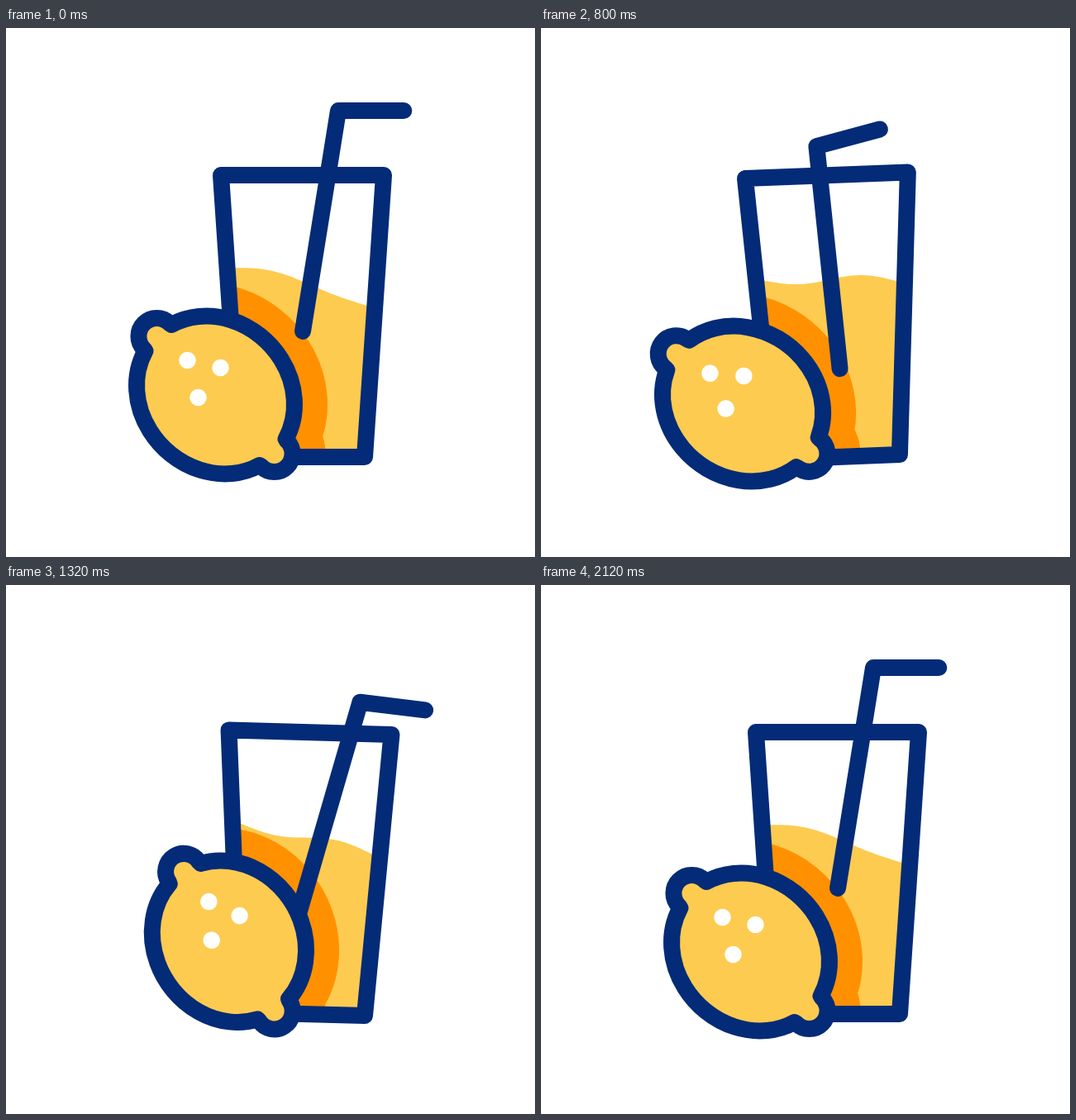
An HTML page with a canvas that plays this animation: 640x640 px, repeating every 2200 ms.

```html
<!DOCTYPE html>
<html lang="en">
<head>
<meta charset="utf-8">
<title>Lemonade</title>
<style>
html, body { margin: 0; width: 100%; height: 100%; overflow: hidden; background: #fff; }
canvas { display: block; width: 100vw; height: 100vh; }
</style>
</head>
<body>
<canvas width="640" height="640"></canvas>
<script>
const ctx = document.querySelector('canvas').getContext('2d');
const NAVY = '#042b77', YELLOW = '#fdcb50', ORANGE = '#ff9100';
const LOOP = 2200, STEP = 40, REST = 2120;
const PI = Math.PI, rad = d => d * PI / 180;

// Swing through [time, value] turning points, easing in and out of each
function swing(t, ...keys) {
  const i = keys.findIndex(k => t < k[0]);
  if (i === 0) return keys[0][1];
  if (i < 0) return keys[keys.length - 1][1];
  const [t0, a] = keys[i - 1], [t1, b] = keys[i];
  const x = (t - t0) / (t1 - t0);
  return a + (b - a) * x * x * (3 - 2 * x);
}

const tilt = t => swing(t, [20, 0], [540, -13], [1060, 8.6], [1580, -5.4], [1900, 0]);
const roll = t => swing(t, [110, 0], [620, -18], [1140, 17.8], [1730, -8.5], [1990, 0]);
const stir = t => swing(t, [0, 0], [440, 13], [960, -20.5], [1480, 13], [1880, 0]);
const dip = t => swing(t, [80, 0], [1000, 51], [1880, 0]);
const slope = t => swing(t, [0, 23], [720, 0], [1120, 30], [1520, 2], [2040, 23]);

function polyline(points) {
  const p = new Path2D();
  points.forEach(([x, y]) => p.lineTo(x, y));
  return p;
}

function stroke(path, color, width) {
  ctx.strokeStyle = color;
  ctx.lineWidth = width;
  ctx.stroke(path);
}

const glass = polyline([[-98.5, -341], [98.5, -341], [75.5, 0], [-75.5, 0]]);
glass.closePath();
const straw = polyline([[-8.5, 53], [34.5, -214], [113.8, -214]]);

// Tilted body with a round nub at each end
const lemon = new Path2D();
for (const turn of [0, PI]) {
  const nub = 100.5 * Math.cos(turn);
  lemon.ellipse(0, 0, 101, 89.6, 0, turn + 0.254, turn + PI - 0.254);
  lemon.arc(-nub, 0, 22, turn + PI / 2, turn + PI * 1.5);
}
lemon.closePath();

// Surface = slope + bow + ripple across the glass
function liquid(t) {
  const w = 2 * PI * Math.min(t, REST) / REST;
  const a = slope(t);
  const bow = 1.8 + 5 * Math.cos(2 * w);
  const ripple = 5.2 * Math.cos(w) - 1.8;
  const points = [[100, 20], [-100, 20]];
  for (let x = -100; x <= 100; x += 2) {
    const u = x / 79;
    points.push([x, -215.5 + a * (u + 0.13) + bow * u * u + ripple * Math.sin(PI * u)]);
  }
  const p = polyline(points);
  p.closePath();
  return p;
}

function enterGlass(t) {
  ctx.translate(358.5, 519);
  ctx.rotate(rad(tilt(t)));
}

// The lemon rolls about its lower nub
function enterLemon(t) {
  ctx.translate(323, 516);
  ctx.rotate(rad(roll(t)));
  ctx.translate(-69.5, -72);
}

function draw(t) {
  ctx.setTransform(1, 0, 0, 1, 0, 0);
  ctx.fillStyle = '#fff';
  ctx.fillRect(0, 0, 640, 640);
  ctx.lineJoin = ctx.lineCap = 'round';

  // Liquid, with the lemon's shade inside it
  const juice = liquid(t);
  ctx.save();
  enterGlass(t);
  ctx.clip(glass);
  ctx.fillStyle = YELLOW;
  ctx.fill(juice);
  ctx.clip(juice);
  ctx.setTransform(1, 0, 0, 1, 0, 0);
  enterLemon(t);
  ctx.rotate(PI / 4);
  stroke(lemon, ORANGE, 80);
  ctx.restore();

  // Glass and straw
  ctx.save();
  enterGlass(t);
  stroke(glass, NAVY, 20);
  const drop = dip(t);
  ctx.translate(9 - 0.12 * drop, drop - 205);
  ctx.rotate(rad(stir(t)));
  stroke(straw, NAVY, 20);
  ctx.restore();

  // Lemon
  ctx.save();
  enterLemon(t);
  ctx.rotate(PI / 4);
  ctx.fillStyle = YELLOW;
  ctx.fill(lemon);
  stroke(lemon, NAVY, 20);
  ctx.rotate(-PI / 4);
  ctx.fillStyle = '#fff';
  for (const [x, y] of [[-34, -42], [6, -33], [-21, 3]]) {
    ctx.beginPath();
    ctx.arc(x, y, 10.3, 0, 2 * PI);
    ctx.fill();
  }
  ctx.restore();
}

function tick() {
  const t = performance.now() % LOOP;
  draw(Math.floor(t / STEP) * STEP);
  requestAnimationFrame(tick);
}
tick();
</script>
</body>
</html>
```
